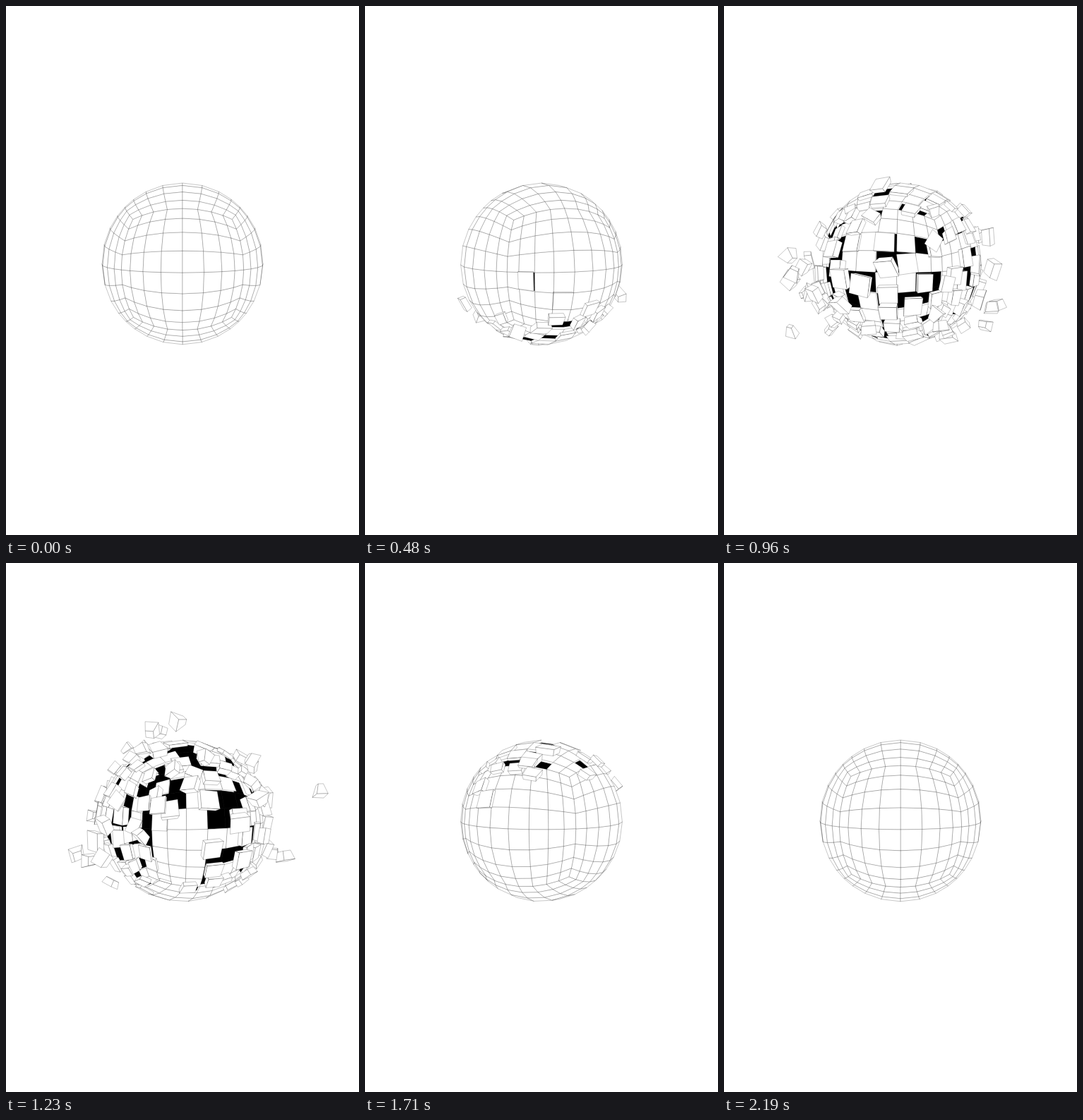
An HTML page with a canvas that plays this animation: 500 px wide and 750 px high, repeating every 2220 ms.

```html
<!DOCTYPE html>
<html lang="en">
<head>
<meta charset="utf-8">
<title>Bursting sphere</title>
<style>
  html, body { margin: 0; width: 100%; height: 100%; overflow: hidden; background: #fff; }
  canvas { display: block; width: 500px; height: 750px; }
</style>
</head>
<body>
<canvas id="stage" width="500" height="750"></canvas>
<script>
const ctx = document.getElementById('stage').getContext('2d');
const STEP = 30, STEPS = 74;
const GRID = 8;               // tiles along one cube edge
const CX = 250, CY = 365.5;
const DIST = 10, FOCAL = 1139; // camera, in sphere radii and pixels
const TILT = Math.asin(0.0988);
const SPAN = 0.32;            // share of the loop one tile spends in flight

let seed = 20;
const rand = () => {
  seed = (seed * 1664525 + 1013904223) >>> 0;
  return seed / 4294967296;
};
const signed = () => rand() * 2 - 1;

const add = (a, b) => a.map((v, i) => v + b[i]);
const mul = (a, k) => a.map(v => v * k);
const dot = (a, b) => a[0] * b[0] + a[1] * b[1] + a[2] * b[2];
const cross = (a, b) => [
  a[1] * b[2] - a[2] * b[1],
  a[2] * b[0] - a[0] * b[2],
  a[0] * b[1] - a[1] * b[0]
];
const unit = a => mul(a, 1 / Math.hypot(...a));

// Turn v around a unit axis.
function spin(v, axis, angle) {
  const c = Math.cos(angle), s = Math.sin(angle);
  return add(add(mul(v, c), mul(cross(axis, v), s)), mul(axis, dot(axis, v) * (1 - c)));
}

function makeTile(axis, side, i, j) {
  const corner = (di, dj) => {
    const p = [0, 0, 0];
    p[axis] = side;
    p[(axis + 1) % 3] = (i + di) * 2 / GRID - 1;
    p[(axis + 2) % 3] = side * ((j + dj) * 2 / GRID - 1);
    return unit(p);
  };
  const home = [corner(0, 0), corner(1, 0), corner(1, 1), corner(0, 1)];
  const mid = mul(home.reduce(add), 0.25);
  const r = rand();
  return {
    home, mid,
    normal: unit(mid),
    local: home.map(p => add(p, mul(mid, -1))),
    fixed: rand() < 0.35,
    start: 0.06 + 0.165 * (mid[1] + 1) + 0.22 * rand(),
    reach: 0.04 + 0.14 * r + 0.75 * r ** 9,
    drift: [signed() * 0.13, signed() * 0.1, signed() * 0.13],
    axis: unit([signed(), signed(), signed()]),
    turn: 0.05 + 0.45 * r * r + 1.8 * r ** 8
  };
}

const tiles = [];
for (let axis = 0; axis < 3; axis++)
  for (const side of [1, -1])
    for (let i = 0; i < GRID; i++)
      for (let j = 0; j < GRID; j++) tiles.push(makeTile(axis, side, i, j));

function makeView(angle) {
  const c = Math.cos(angle), s = Math.sin(angle);
  const ct = Math.cos(TILT), st = Math.sin(TILT);
  return ([x, y, z]) => {
    const depth = z * c - x * s;
    return [x * c + z * s, y * ct - depth * st, y * st + depth * ct];
  };
}

function project([x, y, z]) {
  const k = FOCAL / (DIST - z);
  return [CX + x * k, CY - y * k];
}

function drawFace(points, fill = '#fff', width = 0.23) {
  const flat = points.map(project);
  let area = 0;
  flat.forEach((p, i) => {
    const q = flat[(i + 1) % flat.length];
    area += p[0] * q[1] - q[0] * p[1];
  });
  if (area >= 0) return;      // faces away from the camera
  ctx.beginPath();
  flat.forEach(p => ctx.lineTo(p[0], p[1]));
  ctx.closePath();
  ctx.fillStyle = fill;
  ctx.fill();
  ctx.lineWidth = width;
  ctx.stroke();
}

// A loose tile is a tapered block that flies out and comes back.
function makeBlock(tile, lift, t, view) {
  const { normal, local, mid, reach } = tile;
  const far = reach * lift;
  const depth = 0.035 + 0.05 * lift + 0.14 * far;
  const size = 1 - 0.3 * far;
  const taper = 0.95 - 0.65 * Math.min(1, far);
  const rise = 0.7 * Math.sin(Math.PI * t) ** 4 - 0.15;
  const move = add(mul(normal, far), mul(tile.drift, lift));
  move[1] += normal[1] * (far * (rise - 1) - 0.07 * lift);
  const at = add(mid, move);
  const place = p => view(add(at, spin(mul(p, size), tile.axis, tile.turn * lift)));
  return {
    outer: local.map(place),
    inner: local.map(p => place(add(mul(p, taper), mul(normal, -depth)))),
    z: view(at)[2]
  };
}

function drawBlock({ outer, inner }) {
  drawFace([...inner].reverse());
  outer.forEach((p, i) => {
    const n = (i + 1) % 4;
    drawFace([p, inner[i], inner[n], outer[n]]);
  });
  drawFace(outer);
}

function render(t) {
  const view = makeView(Math.PI * t * t * (3 - 2 * t));
  const still = [], holes = [], blocks = [];
  for (const tile of tiles) {
    const u = (t - tile.start) / SPAN;
    if (tile.fixed || u <= 0 || u >= 1) {
      still.push(tile);
      continue;
    }
    holes.push(tile);
    blocks.push(makeBlock(tile, Math.sin(Math.PI * u), t, view));
  }
  blocks.sort((a, b) => a.z - b.z);

  ctx.fillStyle = '#fff';
  ctx.fillRect(0, 0, 500, 750);
  ctx.lineJoin = 'round';
  ctx.strokeStyle = '#000';

  blocks.filter(b => b.z < 0).forEach(drawBlock);
  ctx.beginPath();
  ctx.arc(CX, CY, 111, 0, Math.PI * 2);
  ctx.fillStyle = '#fff';
  ctx.fill();
  for (const tile of holes)
    drawFace(tile.home.map(p => view(mul(p, 0.965))), '#000', 0.7);
  for (const tile of still) drawFace(tile.home.map(view));
  blocks.filter(b => b.z >= 0).forEach(drawBlock);
}

const begin = performance.now();
let shown = -1;
function tick() {
  const step = Math.floor((performance.now() - begin) / STEP) % STEPS;
  if (step !== shown) render(step / (STEPS - 1));
  shown = step;
  requestAnimationFrame(tick);
}
tick();
</script>
</body>
</html>
```
